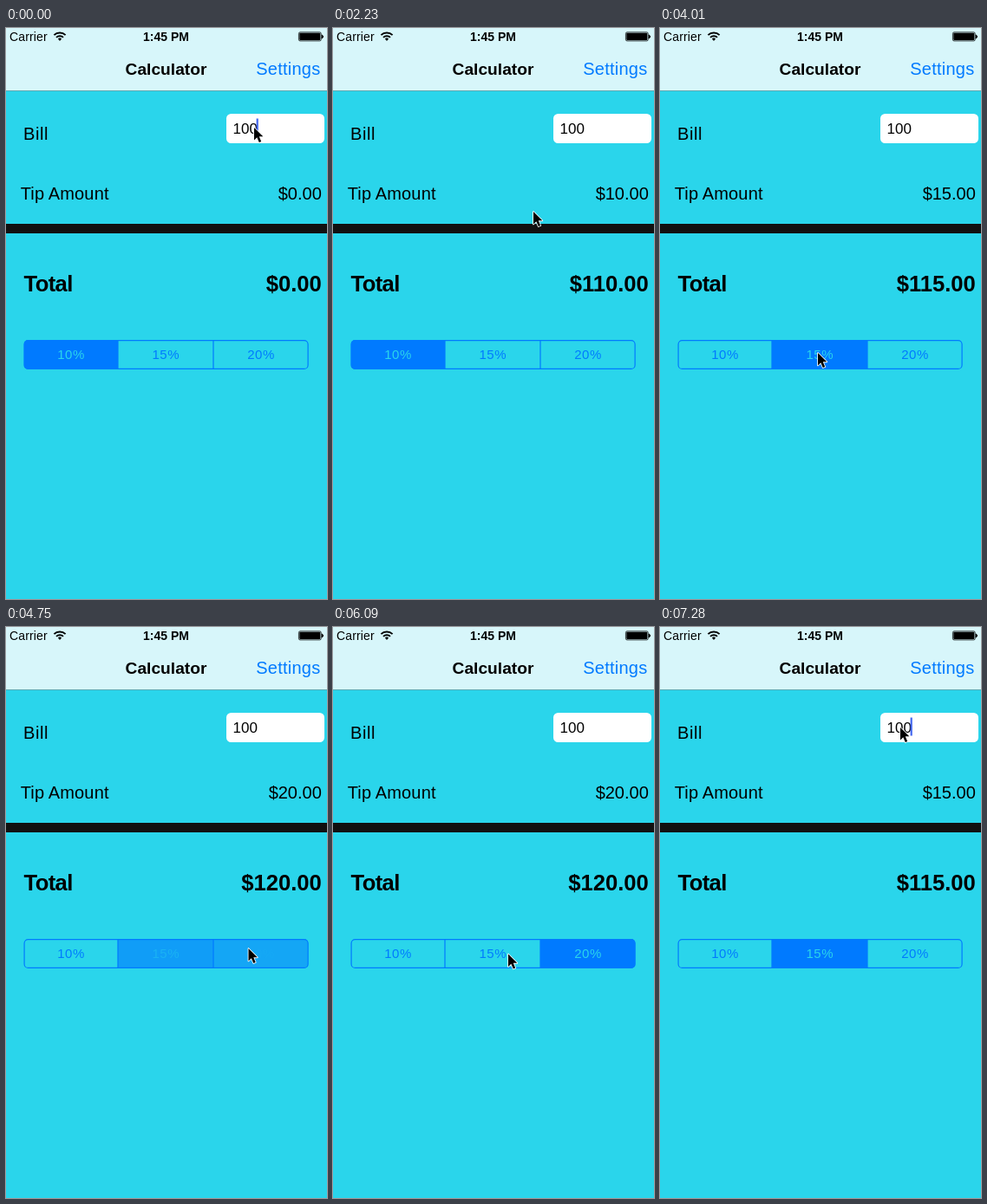
Recreate the animation shown at these times as an HTML page. Size 370 by 659 pixels, loop 8000 ms.

```html
<!DOCTYPE html>
<html lang="en">
<head>
<meta charset="utf-8">
<title>Calculator</title>
<style>
  html, body { margin: 0; width: 100%; height: 100%; overflow: hidden; background: #2ad5eb; }
  svg { display: block; width: 100%; height: 100%; }
  text { font-family: "Liberation Sans", Arial, sans-serif; font-size: 20px; }
  .bold { font-weight: bold; }
  .end { text-anchor: end; }
  .mid { text-anchor: middle; }
</style>
</head>
<body>
<svg viewBox="0 0 370 659" xmlns="http://www.w3.org/2000/svg">
  <defs>
    <clipPath id="pill"><rect x="20.5" y="360" width="328" height="34" rx="5"/></clipPath>
  </defs>
  <rect width="370" height="659" fill="#2ad5eb"/>

  <!-- status and navigation bars -->
  <rect width="370" height="72" fill="#d7f6fa"/>
  <rect y="72" width="370" height="1" fill="#5fa9b3"/>
  <text x="4" y="15" style="font-size:14px;letter-spacing:.15px">Carrier</text>
  <g fill="none" stroke="#000" stroke-width="1.9">
    <path d="M55.4 8.2A9.3 9.3 0 0 1 68.6 8.2"/>
    <path d="M58 10.9A5.6 5.6 0 0 1 66 10.9"/>
    <path d="M62 15L59.9 12.6A3 3 0 0 1 64.1 12.6Z" fill="#000" stroke="none"/>
  </g>
  <text class="bold mid" x="184.5" y="15" style="font-size:14px">1:45 PM</text>
  <rect x="337.4" y="4.9" width="25.8" height="10" rx="1.6" fill="none" stroke="#000" stroke-width=".8"/>
  <rect x="338.3" y="5.8" width="24" height="8.2" rx=".8"/>
  <path d="M364.2 8A2.2 2.2 0 0 1 364.2 12Z" stroke="#000"/>
  <text class="bold mid" x="184.5" y="54" style="font-size:19.2px">Calculator</text>
  <text x="288.2" y="54" fill="#007aff" style="letter-spacing:.25px">Settings</text>

  <!-- bill, tip and total -->
  <text x="20" y="128.5" style="letter-spacing:.6px">Bill</text>
  <rect x="254" y="99" width="113" height="34" rx="5.5" fill="#fff"/>
  <text x="261.5" y="122" style="font-size:17px">100</text>
  <rect id="caret" x="288.6" y="104.5" width="2.2" height="21" fill="#4468f0"/>
  <text x="16.7" y="197.5" style="letter-spacing:.15px">Tip Amount</text>
  <text id="tip" class="end" x="363.8" y="197.5"></text>
  <rect y="226" width="370" height="11" fill="#111"/>
  <text class="bold" x="20.5" y="304" style="font-size:25.6px;letter-spacing:-.6px">Total</text>
  <text id="total" class="bold end" x="363.8" y="304" style="font-size:25.6px"></text>

  <!-- percentage picker -->
  <g id="fills" clip-path="url(#pill)"></g>
  <g fill="none" stroke="#007aff" stroke-width="1.2">
    <rect x="21.1" y="360.6" width="327" height="32.8" rx="4.5"/>
    <path d="M129 360.5V393.5M239 360.5V393.5"/>
  </g>
  <g id="labels"></g>

  <path id="cursor" d="M0 0V14.4L3.3 11.3L5.8 17L8.2 16L5.8 10.3H10.3Z"
        stroke="#fff" stroke-width="1.7" stroke-linejoin="round" paint-order="stroke"/>
</svg>
<script>
const LOOP = 8000, TICK = 148.5;
const $ = id => document.getElementById(id);
const edges = [20.5, 129, 239, 348.5];
const rates = [10, 15, 20];

// pointer path: tick, x, y
const path = [
  [0, 286, 115], [1, 281, 125], [3, 236, 180], [4, 225, 192], [6, 232, 194],
  [14, 232, 194], [15, 231, 212], [17, 186, 362], [18, 178, 374],
  [26, 178, 374], [27, 182, 375], [29, 222, 384], [31, 280, 373], [33, 279, 369],
  [36, 279, 369], [37, 274, 366], [39, 245, 380], [40, 215, 381], [42, 189, 374],
  [43, 189, 374], [44, 188, 342], [46, 297, 96], [47, 277, 116], [54, 277, 116]
];

// taps: tick of the press, segment left, segment chosen
const taps = [[20, 0, 1], [31, 1, 2], [42, 2, 1]];

function make(tag, attrs, parent) {
  const el = document.createElementNS("http://www.w3.org/2000/svg", tag);
  for (const k in attrs) el.setAttribute(k, attrs[k]);
  return parent.appendChild(el);
}

const segs = rates.map((rate, i) => {
  const x = edges[i], width = edges[i + 1] - x;
  const fill = make("rect", { x, y: 360, width, height: 34 }, $("fills"));
  const label = make("text", { x: x + width / 2 + .3, y: 382, class: "mid",
    style: "font-size:15px;letter-spacing:.6px" }, $("labels"));
  label.textContent = rate + "%";
  return { fill, label };
});

// cyan at 0, blue at 1
function tint(a) {
  const mix = (p, q) => Math.round(p + (q - p) * a);
  return `rgb(${mix(42, 0)},${mix(213, 122)},${mix(235, 255)})`;
}

function pointer(n) {
  const i = path.findIndex(p => p[0] >= n);
  if (i < 1) return path[0].slice(1);
  const [t0, x0, y0] = path[i - 1], [t1, x1, y1] = path[i];
  const k = (n - t0) / (t1 - t0);
  return [x0 + (x1 - x0) * k, y0 + (y1 - y0) * k];
}

function picker(n) {
  const level = [1, 0, 0];
  let rate = 10;
  for (const [start, from, to] of taps) {
    const age = n - start;
    if (age < 0) break;
    level[from] = [1, .62][age] ?? 0;
    level[to] = [.1, .52][age] ?? 1;
    if (age > 0) rate = rates[to];
  }
  return { level, rate };
}

function draw(ms) {
  const n = Math.floor((ms % LOOP + 15) / TICK);
  const { level, rate } = picker(n);
  const tip = n < 4 ? 0 : rate;
  $("tip").textContent = "$" + tip.toFixed(2);
  $("total").textContent = "$" + (tip ? 100 + tip : 0).toFixed(2);
  $("caret").setAttribute("visibility", n < 4 || n >= 49 ? "visible" : "hidden");
  segs.forEach(({ fill, label }, i) => {
    fill.setAttribute("fill", tint(level[i]));
    label.setAttribute("fill", tint(1 - level[i]));
  });
  $("cursor").setAttribute("transform", `translate(${pointer(n)})`);
}

const t0 = performance.now();
function frame() {
  draw(performance.now() - t0);
  requestAnimationFrame(frame);
}
frame();
</script>
</body>
</html>
```
